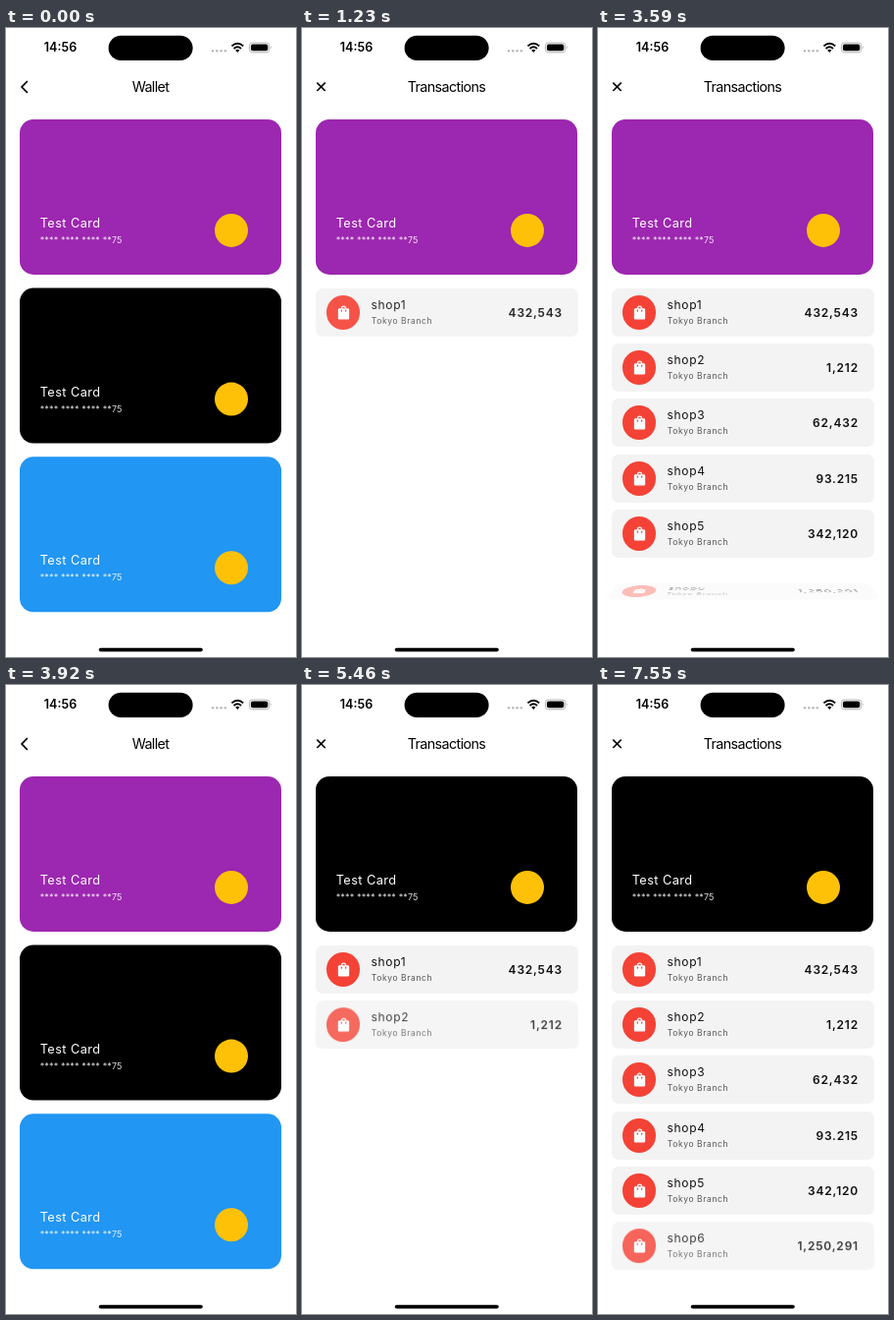
Write an HTML page that moves like this. It is 296x640 px and loops after 8000 ms.

```html
<!DOCTYPE html>
<html lang="en">
<head>
<meta charset="utf-8">
<title>Wallet</title>
<style>
  html, body { margin: 0; width: 100%; height: 100%; overflow: hidden; background: #fff; }
  body { position: relative; font-family: Inter, "Open Sans", sans-serif; color: #111; }
  body *, .chrome { position: absolute; white-space: nowrap; }
  .chrome { left: 0; top: 0; }
  .chrome text { font-weight: 600; font-size: 12.6px; }
  .title { left: 0; width: 295px; top: 50px; text-align: center; font-size: 14.3px; line-height: 20px; letter-spacing: -.6px; color: #000; }
  .card { left: 13.7px; top: 0; width: 267.6px; height: 157.8px; border-radius: 14px; color: #fff; }
  .card .holder { left: 21px; top: 98px; font-size: 12.8px; line-height: 16px; letter-spacing: .4px; }
  .card .number { left: 21px; top: 117px; font-size: 9px; line-height: 12px; letter-spacing: .15px; opacity: .88; }
  .card .badge { left: 199px; top: 96px; width: 34.4px; height: 34.4px; border-radius: 50%; background: #ffc107; }
  .row { left: 13.7px; width: 267.6px; height: 49px; border-radius: 7px; background: #f3f3f3; }
  .row .icon { left: 11px; top: 7.3px; width: 34.4px; height: 34.4px; border-radius: 50%; background: #f44336; }
  .row svg { left: 8.7px; top: 8.7px; width: 17px; height: 17px; fill: #fff; }
  .row .name { left: 56.6px; top: 9px; font-size: 12px; line-height: 15px; letter-spacing: .65px; }
  .row .branch { left: 56.8px; top: 27px; font-size: 8.5px; line-height: 12px; letter-spacing: .6px; color: #555; }
  .row .amount { right: 15.6px; top: 17px; font-size: 12px; line-height: 15px; font-weight: 600; letter-spacing: .8px; }
</style>
</head>
<body>
<svg class="chrome" width="296" height="640" viewBox="0 0 296 640">
  <text x="38.8" y="24.4">14:56</text>
  <rect x="104.6" y="7.8" width="86" height="25.2" rx="12.6"/>
  <g fill="#b8b8b8">
    <circle cx="211" cy="23.2" r="1.2"/><circle cx="215.3" cy="23.2" r="1.2"/>
    <circle cx="219.6" cy="23.2" r="1.2"/><circle cx="223.9" cy="23.2" r="1.2"/>
  </g>
  <g fill="none" stroke="#000" stroke-width="1.9">
    <path d="M230.4 18.4Q236.3 13 242.2 18.4"/>
    <path d="M232.6 21Q236.3 17.6 240 21"/>
  </g>
  <path d="M234.2 22.6Q236.3 21 238.4 22.6L236.3 24.9Z"/>
  <rect x="248.4" y="15" width="20.4" height="9.8" rx="3.2" fill="none" stroke="#aaa" stroke-width=".9"/>
  <rect x="249.9" y="16.5" width="17.4" height="6.8" rx="2"/>
  <path d="M270 18.3q1.5 1.6 0 3.2z" fill="#aaa"/>
  <path id="nav" fill="none" stroke="#000" stroke-width="1.7"/>
  <rect x="94.8" y="630.7" width="106" height="3.8" rx="1.9"/>
</svg>
<div class="title" id="title"></div>
<script>
const TOP = 92.9, CARD_H = 157.8, CARD_PITCH = 171.7, ROW_TOP = 264.8, ROW_PITCH = 56.3;
const LOOP = 8000, RESET = 3920, FLIP = 425, STAGGER = 520;
const BAG = 'M18 6h-2c0-2.21-1.79-4-4-4S8 3.79 8 6H6c-1.1 0-2 .9-2 2v12c0 1.1.9 2 2 2h12c1.1 0 2-.9 2-2V8c0-1.1-.9-2-2-2z' +
  'm-8 4c0 .55-.45 1-1 1s-1-.45-1-1V8h2v2zm2-6c1.1 0 2 .9 2 2h-4c0-1.1.9-2 2-2zm4 6c0 .55-.45 1-1 1s-1-.45-1-1V8h2v2z';
const amounts = ['432,543', '1,212', '62,432', '93.215', '342,120', '1,250,291'];

// The picture refreshes in bursts: [first, last, steps].
const bursts = [[850, 1230, 6], [1460, 1710, 4], [1930, 2170, 4], [2460, 2740, 5], [2980, 3240, 4], [3510, 3920, 6],
  [4760, 4980, 4], [5220, 5460, 4], [5750, 6030, 5], [6260, 6500, 4], [6780, 7110, 5], [7390, 7550, 3]];
const ticks = [0];
for (const [first, last, steps] of bursts)
  for (let k = 0; k < steps; k++)
    ticks.push(Math.floor((first + (last - first) * k / (steps - 1)) / 10) * 10);

const sessions = [
  { card: 0, open: 780, row: i => [840 + STAGGER * i, FLIP] },
  { card: 1, open: 4678, row: i => i ? [4600 + STAGGER * i, FLIP] : [4720, 300] }
];

const clamp = x => Math.min(1, Math.max(0, x));

// cubic-bezier(.25, .1, .25, 1)
function ease(x) {
  x = clamp(x);
  let lo = 0, hi = 1;
  for (let i = 0; i < 24; i++) {
    const u = (lo + hi) / 2, v = 1 - u;
    if (.75 * u * v * v + .75 * u * u * v + u ** 3 < x) lo = u; else hi = u;
  }
  return .3 * lo * (1 - lo) ** 2 + 3 * lo * lo * (1 - lo) + lo ** 3;
}

function add(className, html) {
  const el = document.createElement('div');
  el.className = className;
  el.innerHTML = html;
  document.body.append(el);
  return el;
}

const rows = amounts.map((amount, i) => {
  const el = add('row', `<div class="icon"><svg viewBox="0 0 24 24"><path d="${BAG}"/></svg></div>
    <div class="name">shop${i + 1}</div><div class="branch">Tokyo Branch</div><div class="amount">${amount}</div>`);
  el.style.top = ROW_TOP + ROW_PITCH * i + 'px';
  return el;
});

const cards = ['#9c27b0', '#000', '#2196f3'].map(color => {
  const el = add('card', '<div class="holder">Test Card</div><div class="number">**** **** **** **75</div><div class="badge"></div>');
  el.style.background = color;
  return el;
});

const title = document.getElementById('title'), nav = document.getElementById('nav');

function draw(now) {
  const time = now % LOOP;
  const t = ticks.findLast(tick => tick <= time);
  const { card, open, row } = sessions[t < RESET ? 0 : 1];
  const rest = 1 - ease((t - open) / 300);
  const inWallet = rest > .4;

  title.textContent = inWallet ? 'Wallet' : 'Transactions';
  nav.setAttribute('d', inWallet ? 'M21.9 54L16.1 60L21.9 66' : 'M15.3 55.6L23.7 64M23.7 55.6L15.3 64');

  cards.forEach((el, i) => {
    const y = TOP + CARD_PITCH * (i === card ? i * rest : i);
    el.style.transform = `translateY(${y}px)`;
    el.style.visibility = i > card && rest < 1 ? 'hidden' : 'visible';
    el.style.clipPath = i < card && rest < 1 ? `inset(0 0 ${CARD_H * (1 - rest ** 1.75)}px 0)` : 'none';
  });

  const push = rest * (CARD_PITCH * card + 102 * (2 - card));
  rows.forEach((el, i) => {
    const [start, length] = row(i);
    const p = clamp((t - start) / length), left = 1 - ease(p);
    el.style.opacity = p;
    el.style.visibility = p > 0 ? 'visible' : 'hidden';
    el.style.transform = left > 0
      ? `translateY(${push + 6 * left}px) perspective(500px) rotateX(${180 * left}deg)` : 'none';
  });
}

const begin = performance.now();
function frame() {
  draw(performance.now() - begin);
  requestAnimationFrame(frame);
}
frame();
</script>
</body>
</html>
```
